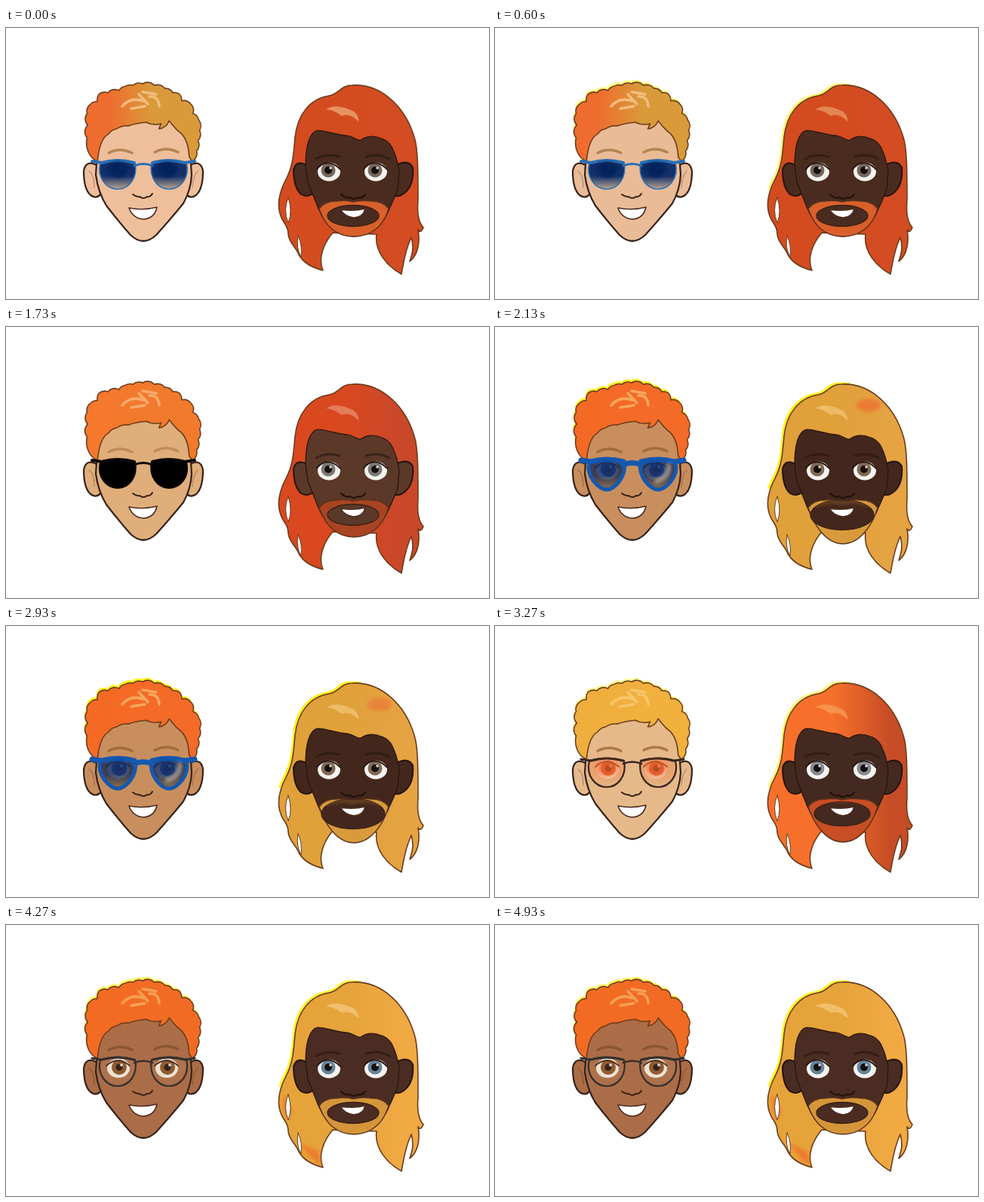
These frames come from a looping animation (640x360 px, 5000 ms). An HTML page:

```html
<!DOCTYPE html>
<html lang="en">
<head>
<meta charset="utf-8">
<title>Two changing faces</title>
<style>
html, body { margin: 0; width: 100%; height: 100%; overflow: hidden; background: #fff; }
svg { display: block; width: 100vw; height: 100vh; }
path, ellipse, circle { stroke-linecap: round; stroke-linejoin: round; }
.head { filter: url(#edge); }
.line { fill: none; stroke: #3a2418; }
.skinA { fill: var(--skinA); stroke: #35231a; stroke-width: 2.2; }
.skinB { fill: var(--skinB); stroke: #25150f; stroke-width: 2; }
.bare { stroke: none; }
.hair { stroke: #6b3d1c; stroke-width: 1.6; }
.rim { fill: #fff21c; }
.smile { fill: #fff; stroke: #4d2d20; stroke-width: 1.6; }
.frame { fill: none; stroke: var(--frame); }
.soft { filter: url(#soft); }
</style>
</head>
<body>
<svg viewBox="0 0 640 360">
  <defs>
    <filter id="edge"><feGaussianBlur stdDeviation=".55"/></filter>
    <filter id="soft" x="-30%" y="-30%" width="160%" height="160%"><feGaussianBlur stdDeviation="2"/></filter>
    <clipPath id="rimArea"><path d="M100 60H470V215H100Z"/></clipPath>
    <linearGradient id="hairA">
      <stop offset=".2" style="stop-color:var(--hairA1)"/><stop offset=".6" style="stop-color:var(--hairA2)"/>
    </linearGradient>
    <linearGradient id="hairB">
      <stop offset=".45" style="stop-color:var(--hairB1)"/><stop offset=".85" style="stop-color:var(--hairB2)"/>
    </linearGradient>
    <linearGradient id="lens" x2="0" y2="1">
      <stop offset=".55" style="stop-color:var(--lensTop)"/><stop offset="1" style="stop-color:var(--lensLow)"/>
    </linearGradient>
    <path id="earA" class="skinA" d="M123 184Q106 173 103 190Q103 214 112 222Q120 228 126 220"/>
    <g id="eyeA">
      <ellipse cx="149" cy="190" rx="15" ry="13" fill="#f3ece2"/>
      <circle cx="150" cy="189" r="10" style="fill:var(--irisA)"/>
      <circle cx="150" cy="189" r="4.5" fill="#1d120e"/>
      <circle cx="153" cy="186" r="2" fill="#fff" opacity=".8"/>
      <path class="line" d="M133 187Q148 173 164 187" stroke-width="1.8"/>
    </g>
    <g id="glass">
      <path class="lensShape" fill="url(#lens)" style="opacity:var(--lens)"/>
      <path class="lensShape frame" style="stroke-width:var(--rimWidth)"/>
      <path class="frame" d="M114 177L127 179Q148 173 170 179" style="stroke-width:var(--barWidth)"/>
    </g>
    <g id="eyeB">
      <ellipse cx="428" cy="191" rx="15" ry="12.5" fill="#f5f3ef"/>
      <circle cx="427" cy="189" r="9.5" style="fill:var(--irisB)"/>
      <circle cx="427" cy="189" r="5" fill="#14100e"/>
      <circle cx="430" cy="186" r="1.8" fill="#fff" opacity=".8"/>
      <path class="line" d="M412 187Q427 171 443 188" stroke-width="1.8" style="stroke:#24140e"/>
    </g>
  </defs>
  <rect width="640" height="360" fill="#fff"/>

  <g class="head">
    <g transform="translate(3.6 2.7) scale(.98)">
      <path class="rim curls" transform="translate(-1 -3.5)" style="opacity:var(--rimA)"/>
    </g>
    <use href="#earA"/><use href="#earA" transform="matrix(-1 0 0 1 364 0)"/>
    <path class="skinA bare" d="M119 195L121 140Q182 85 244 140L246 195Z"/>
    <path class="skinA" d="M120 180L119 195Q122 218 133 236Q150 258 165 275Q182 291 199 275Q218 254 235 233Q245 215 246 195L245 180"/>
    <path class="line" d="M110 190Q117 195 117 212M254 190Q248 196 247 212" stroke-width="1.2" opacity=".3"/>
    <g transform="translate(3.6 2.7) scale(.98)">
      <path class="hair curls" fill="url(#hairA)"/>
    </g>
    <path d="M154 104Q165 91 182 97M176 88L188 101M190 91Q202 90 203 104M166 107L184 104M181 85L199 88"
      fill="none" stroke-width="3.5" opacity=".85" style="stroke:var(--shineA)"/>
    <path d="M136 166Q151 158 167 166M197 165Q212 157 228 165"
      fill="none" stroke-width="3.5" opacity=".75" style="stroke:var(--browA)"/>
    <use href="#eyeA"/><use href="#eyeA" x="64"/>
    <use href="#glass"/><use href="#glass" transform="matrix(-1 0 0 1 364 0)"/>
    <path class="frame" d="M170 183Q182 178 194 183" style="stroke-width:var(--bridge)"/>
    <g class="soft">
      <ellipse cx="148" cy="188" rx="14" ry="11" style="fill:var(--glow);opacity:var(--glowOn)"/>
      <ellipse cx="213" cy="188" rx="14" ry="11" style="fill:var(--glow);opacity:var(--glowOn)"/>
    </g>
    <path class="soft" d="M230 184Q232 199 214 205" fill="none" stroke="#dcc9b2" stroke-width="6" style="opacity:var(--crescent)"/>
    <path class="line" d="M168 221Q173 225 177 224Q182 228 187 224Q191 225 194 220" stroke-width="2"/>
    <path class="smile" d="M163 239Q181 243 200 238Q197 253 182 254Q168 253 163 239Z"/>
  </g>

  <g class="head">
    <g clip-path="url(#rimArea)">
      <path class="rim locks" transform="translate(-3 -2.5)" style="opacity:var(--rimB)"/>
    </g>
    <path class="hair locks" fill="url(#hairB)"/>
    <ellipse class="soft" cx="495" cy="104" rx="16" ry="9" fill="#ee7134" style="opacity:var(--patch)"/>
    <path class="soft" d="M369 225Q363 240 373 260L380 248ZM390 290Q402 310 418 320L414 300Z" fill="#f06b27" style="opacity:var(--tips)"/>
    <path d="M374 225Q367 242 374 259Q380 244 374 225ZM387 276Q384 292 391 304Q393 289 387 276Z" fill="#fff" stroke="#6b3d1c" stroke-width="1"/>
    <path d="M424 108Q438 99 461 111Q468 117 467 124Q455 112 445 117Q435 109 424 108Z" opacity=".7" style="fill:var(--shineB)"/>
    <path class="skinB" d="M400 183Q385 174 381 188Q381 212 391 221Q400 226 407 219M517 182Q533 174 539 185Q541 210 527 220Q517 227 511 219"/>
    <path class="skinB" d="M397 182C397 160 401 138 413 136C425 136 440 143 453 143C461 144 464 150 470 149C478 143 488 143 495 146Q508 149 513 162C518 172 519 180 521 190L519 215Q512 232 508 240C500 262 480 276 461 277C440 277 425 266 414 240Q408 225 400 205Z" style="stroke-width:1.2"/>
    <path id="beard" stroke="#5a321c" stroke-width="1.4" style="fill:var(--beard)"/>
    <ellipse cx="460" cy="249.5" stroke="#382016" stroke-width="1.3" style="fill:var(--skinB);rx:var(--holeX);ry:var(--holeY)"/>
    <path class="soft" d="M424 238Q440 229 460 234Q480 229 499 238" fill="none" stroke-width="4" style="stroke:var(--beard);opacity:var(--stache)"/>
    <path class="line" d="M411 174Q425 166 442 171M477 171Q494 166 508 174" stroke-width="3" opacity=".65" style="stroke:#2a1710"/>
    <use href="#eyeB"/><use href="#eyeB" x="62"/>
    <path class="line" d="M444 221Q450 227 456 225Q461 229 466 225Q472 227 476 221" stroke-width="2" style="stroke:#211009"/>
    <path class="smile" d="M443 241Q460 244 476 240Q473 252 461 252Q449 251 443 241Z"/>
  </g>
</svg>
<script>
const all = selector => [...document.querySelectorAll(selector)];
const root = document.documentElement;
const HOLD = 1000, FPS = 15;

const curlEnds = "107,129 106,113 110,101 120,97 122,87 134,85 149,82 158,76 168,75 181,73 197,75 211,79 222,85 231,87 234,96 246,100 249,113 257,122 258,136 256,150 254,164 248,178";
const curls = "M120 178C108 173 103 158 106 146"
  + curlEnds.split(" ").map(end => `A12 12 0 0 1 ${end}`).join("")
  + "L244 172Q243 150 233 140Q226 135 217 123Q213 133 203 134L206 127Q195 130 186 125Q172 126 162 130Q152 129 146 134Q139 135 135 141Q123 147 120 178Z";
const locks = "M459 76C443 76 441 88 428 90C402 94 386 116 383 145C381 165 381 182 371 201C362 218 358 236 365 252C368 260 374 262 374 274C375 286 384 290 388 301C395 314 408 319 420 322C413 306 421 286 433 272L491 274C488 296 504 316 524 327C527 312 528 298 537 278C541 292 538 301 535 310C546 302 549 284 546 268C548 271 550 272 553 265C545 256 545 242 546 228C546 190 546 160 541 145C530 108 500 74 459 76Z";
all(".curls").forEach(p => p.setAttribute("d", curls));
all(".locks").forEach(p => p.setAttribute("d", locks));

// One look per second; each inherits what it does not name, and drifts towards its own second set.
const looks = [];
function look(changes, drift = {}) {
  looks.push({ values: { ...looks.at(-1)?.values, ...changes }, drift });
}
look({
  skinA: "#efbf9c", hairA1: "#ee6c2e", hairA2: "#d99b3a", shineA: "#f5c68a", browA: "#a5713f", rimA: 0,
  irisA: "#10275e", lensTop: "#0b2a68", lensLow: "#b9a48c", lens: .96, frame: "#2870b4", rimWidth: 1.5,
  barWidth: 4, bridge: 3, taper: 0, glow: "#0a1f55", glowOn: .6, crescent: 0,
  skinB: "#492c1f", hairB1: "#d44b20", hairB2: "#d44c22", shineB: "#eeb27c", rimB: 0, patch: 0, tips: 0,
  irisB: "#77675a", beard: "#d9602a", holeX: 34, holeY: 14, chin: 277, stache: 0
}, { skinA: "#e7b894", rimA: 1, rimB: 1, shineB: "#e6905f" });
look({
  skinA: "#dfae7a", hairA1: "#f5782c", hairA2: "#f17a2c", shineA: "#f9b27a", browA: "#b87f4c",
  irisA: "#000000", lensTop: "#000000", lensLow: "#000000", lens: 1, frame: "#0b0807", rimWidth: 2, glow: "#000000",
  skinB: "#5a3928", hairB1: "#d9481f", hairB2: "#c9482a", shineB: "#ea9573",
  irisB: "#7b7977", beard: "#a94423", chin: 279
});
look({
  skinA: "#c98e5d", hairA1: "#f46a25", hairA2: "#f46a27", shineA: "#f7b266", browA: "#94602c", rimA: 1,
  irisA: "#173f92", lensTop: "#15264f", lensLow: "#7d674a", lens: .78, frame: "#1459b0", rimWidth: 5,
  barWidth: 7, bridge: 7, taper: 1, glow: "#123c8c", glowOn: .4, crescent: .6,
  skinB: "#43271c", hairB1: "#e0a03a", hairB2: "#e5a342", shineB: "#f3c679", rimB: 1, patch: .8,
  irisB: "#806a54", beard: "#d99a3c", holeX: 42, holeY: 20, chin: 288, stache: .3
}, { patch: .6 });
look({
  skinA: "#e6b98b", hairA1: "#f0ae3d", hairA2: "#f1b13c", shineA: "#f8c976", browA: "#9c6531", rimA: .45,
  irisA: "#d24d1b", lensTop: "#ee8a4d", lensLow: "#e3b083", lens: .5, frame: "#38271f", rimWidth: 2.2,
  barWidth: 3.2, bridge: 2.6, taper: 0, glow: "#ee4c14", glowOn: .45, crescent: 0,
  skinB: "#43291f", hairB1: "#f6702b", hairB2: "#c64c25", shineB: "#f7a25c", rimB: .6, patch: 0,
  irisB: "#878b91", beard: "#c84e24", holeX: 37, holeY: 16, chin: 287, stache: .35
});
look({
  skinA: "#ab6d47", hairA1: "#f36b22", hairA2: "#f26b24", shineA: "#f5aa5c", browA: "#80502c", rimA: .7,
  irisA: "#8a5227", lensTop: "#c69a75", lensLow: "#b77a4d", lens: .12, frame: "#33302f", glowOn: 0,
  skinB: "#4a2c22", hairB1: "#e6a33a", hairB2: "#f0a943", shineB: "#f6cc80", rimB: .9, tips: .65,
  irisB: "#64859a", beard: "#d5963a", holeX: 34, holeY: 14, chin: 278, stache: 0
});

const channels = hex => [1, 3, 5].map(i => parseInt(hex.slice(i, i + 2), 16));
function mix(a, b, k) {
  if (typeof a === "number") return a + (b - a) * k;
  const to = channels(b);
  return `rgb(${channels(a).map((v, i) => Math.round(mix(v, to[i], k)))})`;
}

function draw(ms) {
  // Fifteen pictures a second, on ten-millisecond ticks.
  const ticks = Math.floor(ms % (HOLD * looks.length) / 10);
  const time = Math.floor((ticks + .5) * FPS / 100) * 1000 / FPS;
  const { values, drift } = looks[Math.floor((time + 1) / HOLD)];
  const k = time % HOLD / HOLD;
  for (const name in values) {
    const value = name in drift ? mix(values[name], drift[name], k) : values[name];
    root.style.setProperty("--" + name, value);
  }
  root.style.setProperty("--holeX", values.holeX + "px");
  root.style.setProperty("--holeY", values.holeY + "px");

  const { taper, chin } = values;
  const low = 214 + taper * 2, side = 15 - taper * 5;
  const lens = `M125 179Q147 172 171 179C175 199 ${148 + side} ${low} 148 ${low}C${148 - side} ${low} 120 199 125 179Z`;
  all(".lensShape").forEach(p => p.setAttribute("d", lens));
  document.getElementById("beard").setAttribute("d",
    `M415 240Q422 230 438 230Q451 228 460 231Q471 228 484 230Q500 230 507 240C500 264 483 ${chin} 461 ${chin}C439 ${chin} 423 264 415 240Z`);
}

const start = performance.now();
function tick() {
  draw(performance.now() - start);
  requestAnimationFrame(tick);
}
tick();
</script>
</body>
</html>
```
